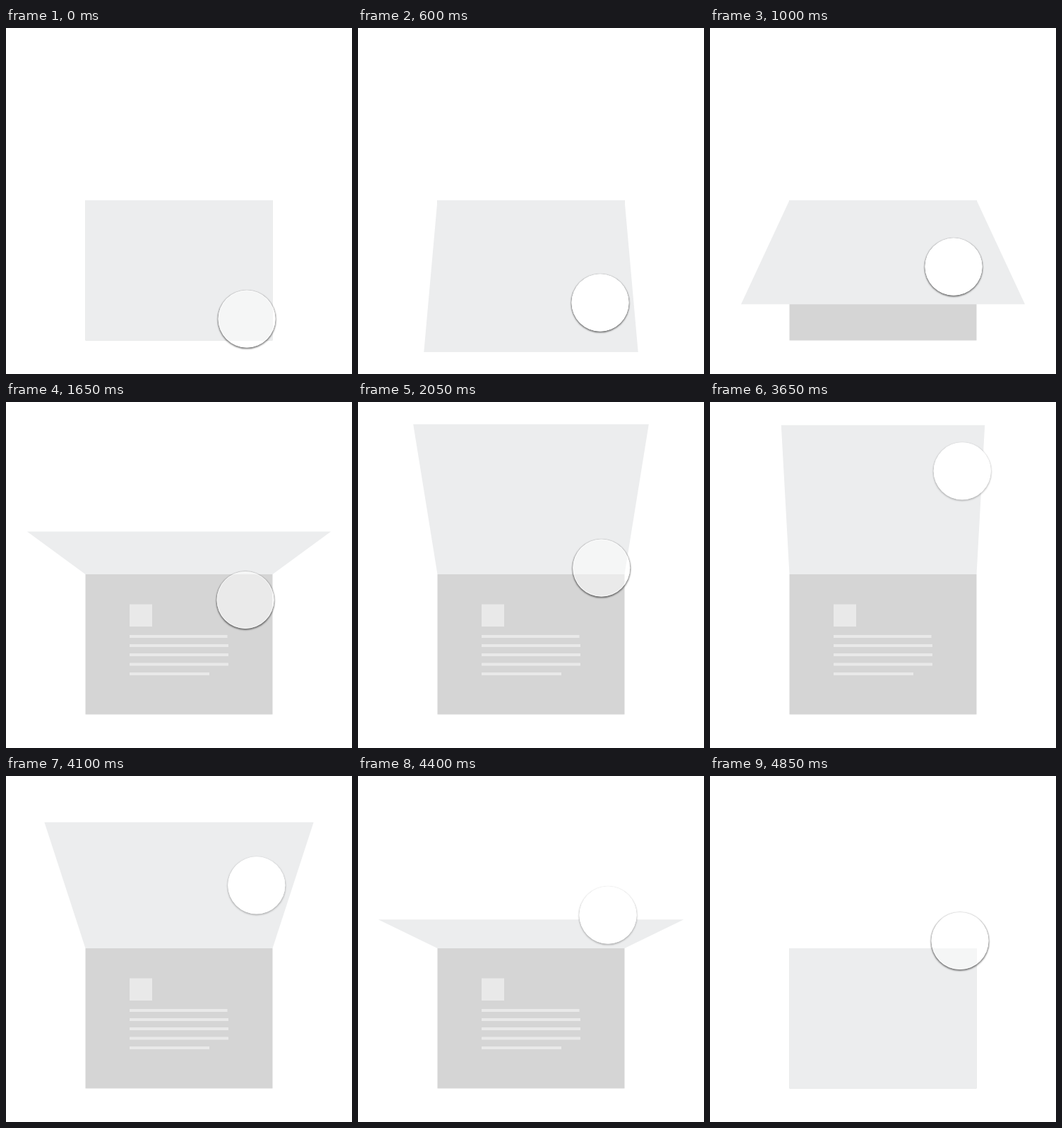
An HTML page that plays this animation: 490x490 px, repeating every 4900 ms.

```html
<!DOCTYPE html>
<html lang="en">
<head>
<meta charset="utf-8">
<title>Unfolding card</title>
<style>
html, body { margin: 0; width: 100%; height: 100%; overflow: hidden; background: #fff; }
svg { display: block; width: 100vw; height: 100vh; }
</style>
</head>
<body>
<svg viewBox="0 0 490 490">
  <defs>
    <clipPath id="outside"><path clip-rule="evenodd" d="M-60-60H60V60H-60ZM-40.500 0a40.500 40.500 0 1 0 81 0a40.500 40.500 0 1 0-81 0Z"/></clipPath>
    <filter id="soft" x="-20%" y="-20%" width="140%" height="140%"><feGaussianBlur stdDeviation=".8"/></filter>
  </defs>
  <rect x="112.5" y="244" width="265" height="198.5" fill="#d5d5d5"/>
  <path fill="#e9e9e9" d="M175 286.5h32v31.5h-32z"/>
  <path stroke="#e9e9e9" stroke-width="4" d="M175 332H313.500M175 345H315M175 358H315M175 371.500H315M175 385H288"/>
  <path id="flap" fill="#ecedee"/>
  <g id="touch">
    <g clip-path="url(#outside)"><circle id="shadow" cy="1.1" r="41.2" filter="url(#soft)"/></g>
    <circle id="disc" r="40.5" fill="#fff"/>
    <circle r="40" fill="none" stroke="#fff" stroke-opacity=".6"/>
  </g>
</svg>
<script>
const LOOP = 4900, STEP = 50;
const HINGE = 244, HEIGHT = 198.5, HALF = 132.5, CENTER = 245, DEPTH = 508;
const el = id => document.getElementById(id);

const ramp = (t, from, to) => Math.min(1, Math.max(0, (t - from) / (to - from)));
const smooth = (t, from, to) => {
  const u = ramp(t, from, to);
  return u * u * (3 - 2 * u);
};

// The flap is dragged half way in each direction, then falls the rest.
function flapAngle(t) {
  const opened = 97 * smooth(t, 225, 1550) + 83 * ramp(t, 1500, 2200) ** 2;
  const closed = 80 * ramp(t, 3375, 4350) ** 1.5 + 100 * smooth(t, 4350, 4850);
  return opened - closed;
}

function touchPoint(t) {
  const sway = 4 * smooth(t, 200, 1000) - 6 * smooth(t, 1000, 1650) + 7 * smooth(t, 1650, 2200);
  const reach = 16 * smooth(t, 2450, 2850) - 4 * smooth(t, 2850, 3100) - 4 * smooth(t, 3350, 4400);
  const lift = 118 * smooth(t, 225, 1550) + 60 * smooth(t, 1450, 2100) + 151 * smooth(t, 2450, 2975);
  const drop = 151 * smooth(t, 3350, 4900);
  return [341 + sway + reach, 412 - lift + drop];
}

// 1 while pressed, 0 while hovering.
function pressure(t) {
  const first = t < 50 ? 0 : 1 - smooth(t, 1300, 1550);
  return first + smooth(t, 3000, 3100) - smooth(t, 4450, 4850);
}

function flapPath(degrees) {
  const a = degrees * Math.PI / 180;
  const scale = DEPTH / (DEPTH - HEIGHT * Math.sin(a));
  const y = HINGE + HEIGHT * Math.cos(a) * scale, half = HALF * scale;
  return `M${CENTER - HALF} ${HINGE}H${CENTER + HALF}L${CENTER + half} ${y}H${CENTER - half}Z`;
}

function draw(t) {
  const shade = 0.55 - 0.3 * (smooth(t, 2450, 2850) - smooth(t, 4450, 4850));
  el('flap').setAttribute('d', flapPath(flapAngle(t)));
  el('touch').setAttribute('transform', `translate(${touchPoint(t)})`);
  el('disc').setAttribute('fill-opacity', 0.5 + 0.5 * pressure(t));
  el('shadow').setAttribute('fill-opacity', shade);
}

const start = performance.now();
function tick() {
  const t = (performance.now() - start) % LOOP;
  draw(Math.floor(t / STEP) * STEP);
  requestAnimationFrame(tick);
}
tick();
</script>
</body>
</html>
```
